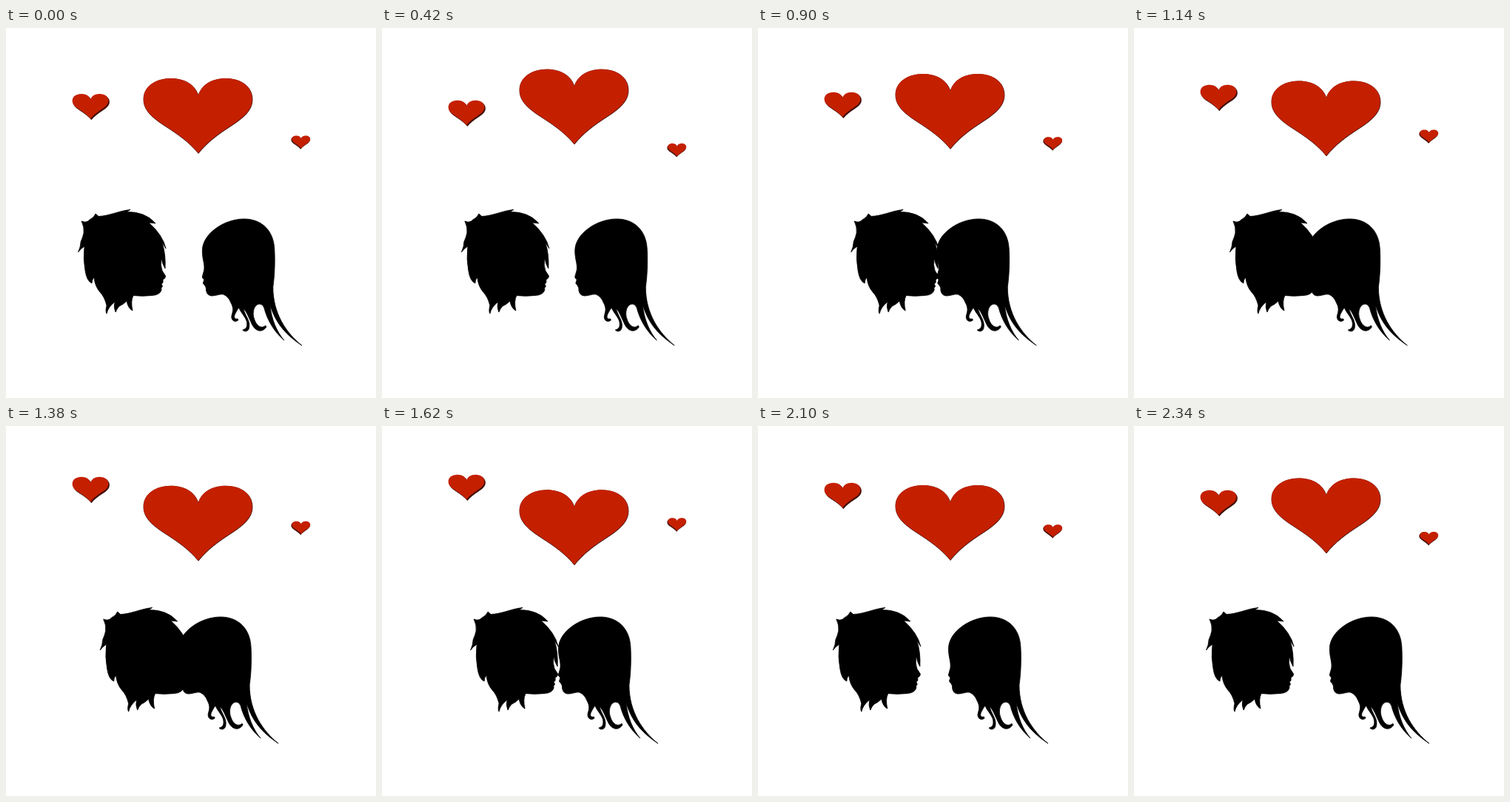
Animation, 500 px wide and 500 px high, one loop 2400 ms. Source, as an HTML page:

```html
<!DOCTYPE html>
<html lang="en">
<head>
<meta charset="utf-8">
<title>Kissing silhouettes</title>
<style>
  html, body { margin: 0; width: 100%; height: 100%; overflow: hidden; background: #fff; }
  svg { display: block; width: 100%; height: 100%; }
  .edge { fill: #3c0a00; stroke: #3c0a00; }
  .face { fill: #c42000; }
  .head { stroke: #000; stroke-width: .8; stroke-linejoin: round; }
</style>
</head>
<body>
<svg viewBox="0 0 500 500">
  <defs>
    <path id="heart" d="M0 23C-4 9-18 0-37 0C-58 0-74 11-74 28C-74 43-62 53-45 64
      C-28 75-12 86 0 101C12 86 27 75 44 64C61 53 73 43 73 28C73 11 58 0 37 0C18 0 4 9 0 23Z"/>
  </defs>
  <g id="big">
    <use href="#heart" class="edge" stroke-width=".8" transform="translate(.2 .5)"/>
    <use href="#heart" class="face"/>
  </g>
  <g id="left">
    <use href="#heart" class="edge" stroke-width="1.5" transform="translate(1.2 1.5) scale(.332)"/>
    <use href="#heart" class="face" transform="scale(.332)"/>
  </g>
  <g id="right">
    <use href="#heart" class="edge" stroke-width="2" transform="translate(-.7 1.1) scale(.17)"/>
    <use href="#heart" class="face" transform="scale(.17)"/>
  </g>
  <path id="boy" class="head" d="M102 261Q109 264 113 259Q119 256 121 251L125 254.500
    C140 254 152 247 168 245.500L163 248.500Q188 248 202 264L193 263Q212 280 216 298L211 290
    Q216 306 215 325Q211 319 210.500 311Q208 320 211 328L215.500 335Q216 338 212 340L212 344
    L210 346L211.500 349Q209 351 210 354Q208 361 197 361.500Q184 363 172 361.500Q168 369 171 382
    Q165 379 163 369Q158 374 153 376Q150 379 148 384Q145 377 147 370Q138 377 136 386
    Q134 383 136 375Q133 363 127 357Q120 349 119 337Q116 340 116 345Q109 342 107 328
    Q104 312 106 295Q101 298 97.500 303Q101 295 101 289Q104 282 105 277Q106 269 102 261Z"/>
  <path id="girl" class="head" d="M321 258C294 258 264.500 278 264.500 301
    C264.500 313 268 318 267 327L264.500 336Q264 338 267 340L265.500 345L268 348L269.500 351
    Q269 361 277 362C284 362 288 359 293 360
    Q300 363 303 371C308 380 305 384 304 390C304 396 309 398 313 395L312.500 393
    C307 394 307 390 309 386Q312 380 314 378C317 386 325 392 325 400C325 406 322 407 319 408
    C321 411 328 411 328 403C329 395 322 388 320 379C325 384 327 391 331 399
    C336 411 346 412 351 404L350 402C343 408 337 400 335 394C331 384 335 373 342 373
    Q346 373 348 378C352 394 361 410 375 422C365 410 358 394 356 374
    C362 394 373 412 399 429C378 412 360 386 360 350C362 336 363 318 362 299
    C361 274 345 258 321 258Z"/>
</svg>
<script>
  const STEP = 60, STEPS = 40;
  const wave = (step, peak) => 16 * Math.cos((step - peak) * 2 * Math.PI / STEPS);

  function place(id, x, y) {
    document.getElementById(id).setAttribute("transform", `translate(${x} ${y})`);
  }

  function draw(now) {
    const step = Math.floor(now / STEP) % STEPS;
    place("big", 259.8, 71 + wave(step, 28.8));
    place("left", 114.2, 81.8 + wave(step, 7));
    place("right", 398.8, 140.2 + wave(step, 7.9));
    place("boy", 16 + wave(step, 19.5), 0);
    place("girl", -14.9 + 1.02 * wave(step, 1.8), 0);
    requestAnimationFrame(draw);
  }
  draw(0);
</script>
</body>
</html>
```
